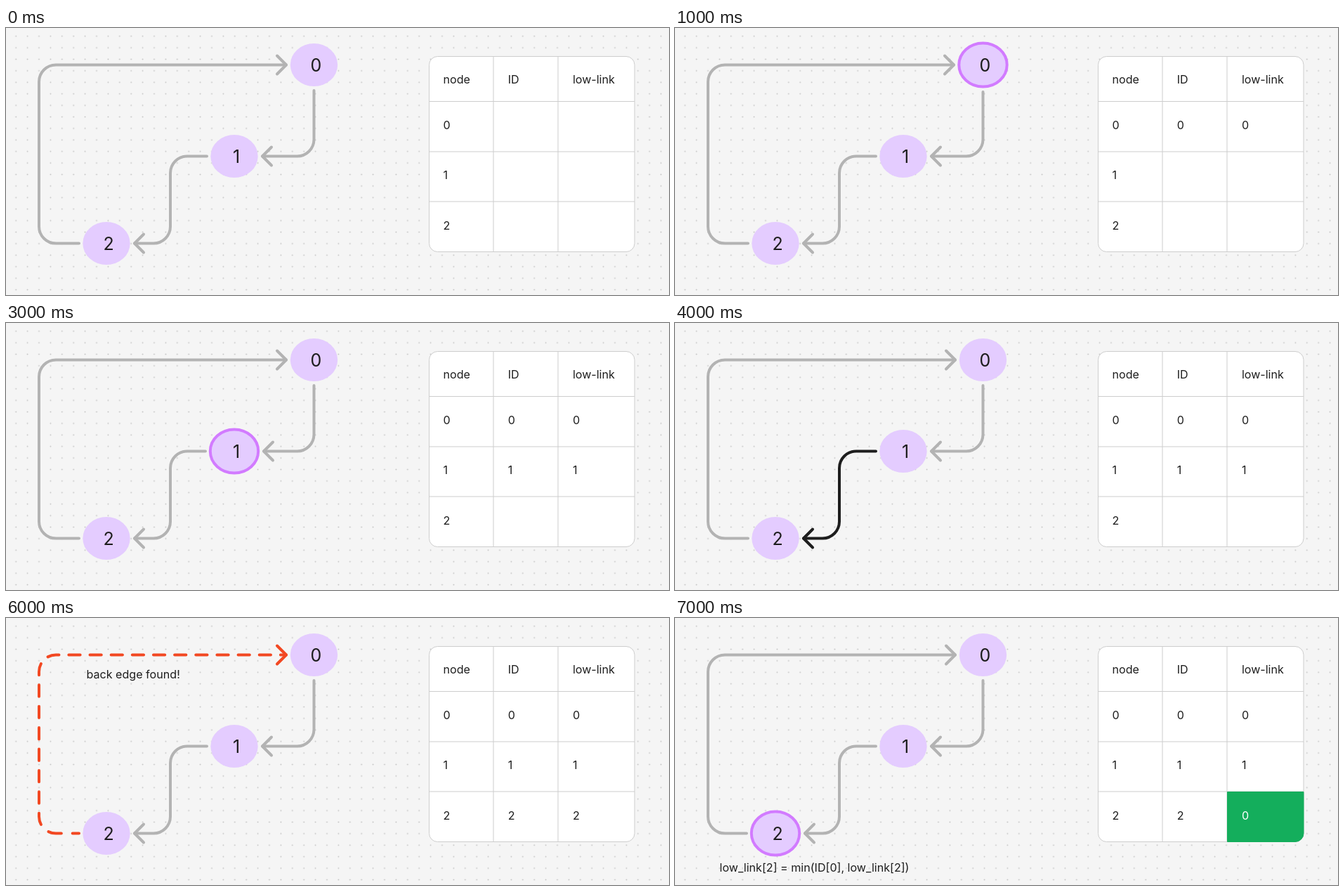
An HTML page for the animation above (8000 ms loop, 944 by 380 pixels).

```html
<!DOCTYPE html>
<html lang="en">
<head>
<meta charset="utf-8">
<title>Low-link values</title>
<style>
  html, body { margin: 0; overflow: hidden; background: #f5f5f5; }
  svg { display: block; width: 944px; height: 380px; font: 400 16.1px Inter, sans-serif; font-optical-sizing: none; fill: #1e1e1e; }
  .edge { fill: none; stroke: #b3b3b3; stroke-width: 4; stroke-linecap: round; stroke-linejoin: round; }
  .edge.active { stroke: #1e1e1e; }
  .edge.back { stroke: #f24822; }
  .edge.back .line { stroke-dasharray: 0.54 0.46; stroke-dashoffset: 0.77; }
  .edge.back .line:first-child { stroke-dashoffset: 0.27; }
  .node ellipse { fill: #e4ccff; }
  .node.active ellipse { stroke: #d27bff; stroke-width: 4; }
  .node text { font-size: 25px; text-anchor: middle; }
  .grid { fill: none; stroke: #cdcdcd; }
</style>
</head>
<body>
<svg id="stage" viewBox="0 0 944 380">
  <defs>
    <pattern id="dots" x="6" y="3.5" width="16.4" height="16.4" patternUnits="userSpaceOnUse">
      <circle cx="8.2" cy="8.2" r="0.95" fill="#c4c4c4"/>
    </pattern>
  </defs>
  <rect width="944" height="380" fill="url(#dots)"/>
  <g id="graph"></g>
  <rect x="602.5" y="40.5" width="292.5" height="278" rx="12" fill="#fff"/>
  <path class="grid" d="M694 40.5V318.5M786 40.5V318.5M602.5 104.5H895M602.5 176H895M602.5 247H895"/>
  <rect class="grid" x="602.5" y="40.5" width="292.5" height="278" rx="12"/>
  <path id="result" d="M786.5 247.5H895V306.5a12 12 0 0 1-12 12H786.5Z" fill="#14ae5c" stroke="#14ae5c"/>
  <g id="table"></g>
  <text id="found" x="114.5" y="86">back edge found!</text>
  <text id="formula" x="63.5" y="360.5">low_link[2] = min(ID[0], low_link[2])</text>
</svg>
<script>
const $ = id => document.getElementById(id);
const nodes = [[438.5, 52.5], [325, 182.5], [143, 306.5]];

// Edge ends pull back by `a` at the tail and `b` at the head to clear a ring.
const edges = [
  (a, b) => [`M438.5 ${89 + a}V158.5a24 24 0 0 1-24 24H${365 + b}`, `M${378 + b} 169.5l-13 13 13 13`],
  (a, b) => [`M${286 - a} 182.5H258a24 24 0 0 0-24 24V282.5a24 24 0 0 1-24 24H${183 + b}`, `M${196 + b} 293.5l-13 13 13 13`],
  (a, b) => [`M${104 - a} 306.5H71a24 24 0 0 1-24-24V76.5a24 24 0 0 1 24-24H${399 - b}`, `M${386 - b} 39.5l13 13-13 13`]
];

// The dashed edge splits mid-corner; each part holds this many dash periods.
const dashedParts = [
  ["M104 306.5H71A24 24 0 0 1 54 299.5", 1.5],
  ["M54 299.5A24 24 0 0 1 47 282.5V76.5A24 24 0 0 1 54 59.5", 8],
  ["M54 59.5A24 24 0 0 1 71 52.5H399", 11.5]
];

// One step per second: highlighted node, highlighted edge, filled rows.
const steps = [
  { rows: 0 },
  { node: 0, rows: 1 },
  { edge: 0, rows: 1 },
  { node: 1, rows: 2 },
  { edge: 1, rows: 2 },
  { node: 2, rows: 3 },
  { edge: 2, rows: 3 },
  { node: 2, rows: 3, done: true }
];

function drawGraph({ node, edge }) {
  const ring = i => i === node ? 2 : 0;
  const lines = edges.map((path, i) => {
    const [line, head] = path(ring(i), ring((i + 1) % 3));
    const back = edge === 2 && i === 2;
    const state = back ? "back" : i === edge ? "active" : "";
    const body = back
      ? dashedParts.map(([d, periods]) => `<path class="line" d="${d}" pathLength="${periods}"/>`).join("")
      : `<path d="${line}"/>`;
    return `<g class="edge ${state}">${body}<path d="${head}"/></g>`;
  });
  const circles = nodes.map(([x, y], i) => {
    const grow = i === node ? 0.5 : 0;
    return `<g class="node ${i === node ? "active" : ""}">
      <ellipse cx="${x}" cy="${y}" rx="${33.7 + grow}" ry="${30.5 + grow}"/>
      <text x="${x + 3}" y="${y + 9.5}">${i}</text></g>`;
  });
  $("graph").innerHTML = lines.concat(circles).join("");
}

function drawTable({ rows, done }) {
  const cells = [["node", "ID", "low-link"]];
  for (let i = 0; i < 3; i++) cells.push(i < rows ? [i, i, done && i === 2 ? 0 : i] : [i]);
  $("table").innerHTML = cells.map((row, r) => row.map((value, c) => {
    const fill = done && r === 3 && c === 2 ? "#fff" : "#1e1e1e";
    const y = r ? 73 + r * 71.2 : 79;
    return `<text x="${622.5 + c * 92.2}" y="${y}" fill="${fill}">${value}</text>`;
  }).join("")).join("");
}

const show = (id, on) => $(id).setAttribute("visibility", on ? "visible" : "hidden");

let current = -1;
function frame(now) {
  const index = Math.floor(now / 1000) % steps.length;
  if (index !== current) {
    current = index;
    const step = steps[index];
    drawGraph(step);
    drawTable(step);
    show("found", step.edge === 2);
    show("formula", step.done);
    show("result", step.done);
  }
  requestAnimationFrame(frame);
}
frame(performance.now());
</script>
</body>
</html>
```
